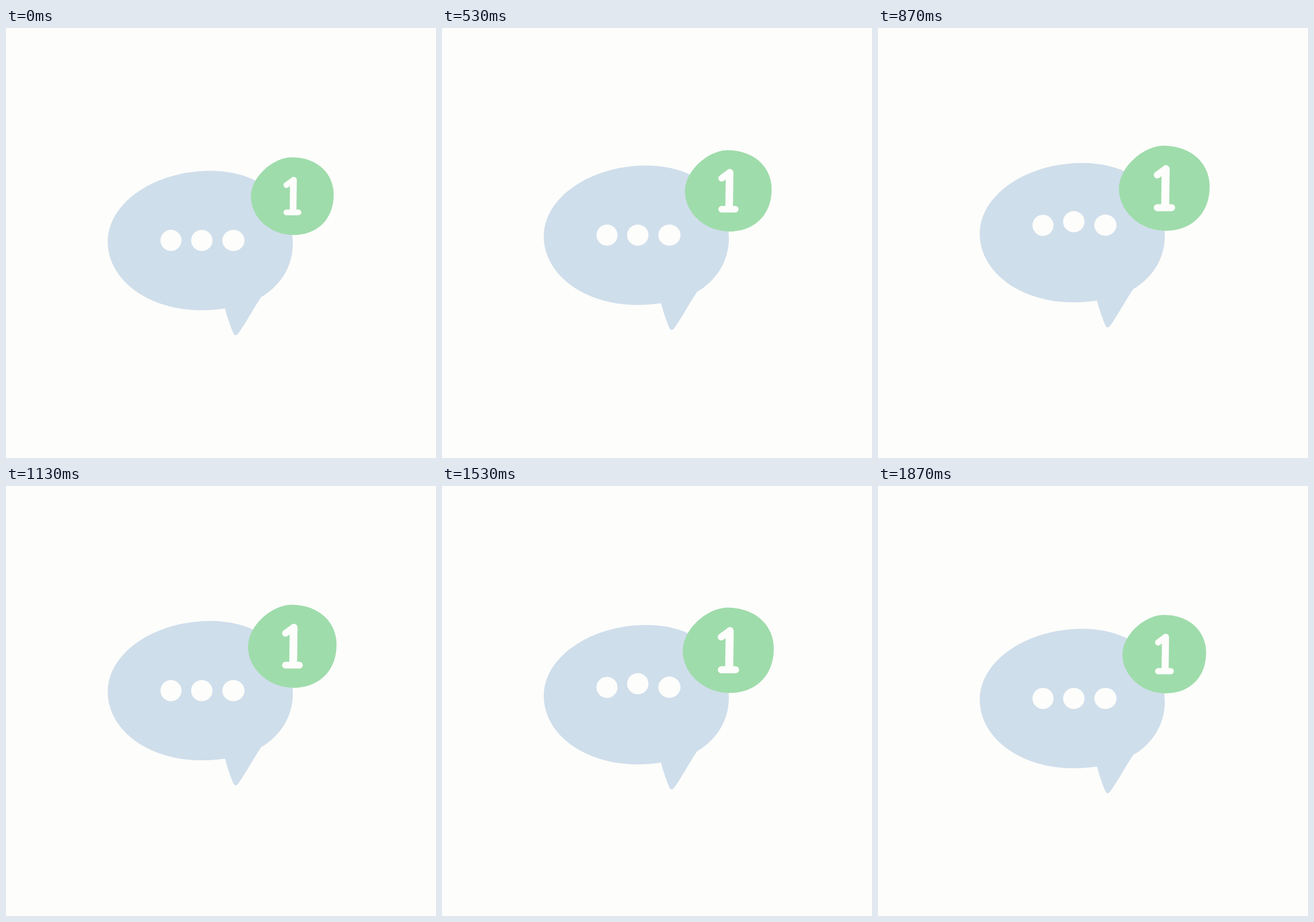
An HTML page that plays this animation: 748x748 px, repeating every 1910 ms.

```html
<!DOCTYPE html>
<html lang="en">
<head>
<meta charset="utf-8">
<title>New message</title>
<style>
html, body { margin: 0; width: 100%; height: 100%; overflow: hidden; background: #fdfdfb; }
svg { display: block; width: 100%; height: 100%; }
</style>
</head>
<body>
<svg viewBox="0 0 748 748">
  <g id="float">
    <path fill="#cfdeeb" d="M177 372C177 303 260 248.5 355 248.5C442 248.5 499 297 499 375
      C499 412 480 447 444 468C434 482 412 522 403 532.5Q399 537 396 532C391 521 385 504 381 488
      C367 490 354 491 340 491C246 491 177 437 177 372Z"/>
    <g fill="#fdfdfb">
      <ellipse class="dot" cx="287" cy="369.6" rx="18.3" ry="18.4"/>
      <ellipse class="dot" cx="340.6" cy="369.6" rx="18.6" ry="18.4"/>
      <ellipse class="dot" cx="395.6" cy="369.6" rx="19.3" ry="18.4"/>
    </g>
    <path id="badge" fill="#9fdcab" d="M426 293C426 259 465 225 497 225C540 225 570 252 570 290
      C570 333 541 360 500 360C460 360 426 330 426 293Z"/>
    <g id="one" fill="none" stroke="#fdfdfb" stroke-width="10" stroke-linecap="round" stroke-linejoin="round">
      <path d="M488 273.5L500.5 264.5M488 320.3H508.5"/>
      <path stroke-width="11.5" d="M500 265.5L499.3 319"/>
    </g>
  </g>
</svg>
<script>
const LOOP = 1910;
const beats = [0, 625, 1285, 1890];
const $ = id => document.getElementById(id);
const dots = document.querySelectorAll('.dot');
const ease = x => (1 - Math.cos(Math.PI * Math.min(1, Math.max(0, x)))) / 2;

// Half-sine hump centred on peak
const hump = (t, peak, half) =>
  Math.abs(t - peak) < half ? Math.cos((t - peak) / half * Math.PI / 2) : 0;

const scale = (el, s) =>
  el.setAttribute('transform', `translate(498 292.7) scale(${s}) translate(-498 -292.7)`);

function draw(now) {
  const t = now % LOOP;
  const lift = 13.7 * (ease(t / 865) - ease((t - 1150) / 750));
  $('float').setAttribute('transform', `translate(0 ${-lift})`);

  let pulse = 0;
  for (let i = 0; i < 3; i++) {
    const half = (beats[i + 1] - beats[i]) / 2;
    pulse += hump(t, beats[i] + half, half);
  }
  scale($('badge'), 1 + 0.104 * pulse);
  scale($('one'), 1 + 0.225 * Math.sqrt(pulse));

  dots.forEach((dot, i) => {
    let hop = 0;
    for (let b = 0; b < 3; b++) hop += hump(t, beats[b] + 160 + 85 * i, 160);
    dot.setAttribute('transform', `translate(0 ${-19 * hop})`);
  });
}

const start = performance.now();
function tick() {
  draw(performance.now() - start);
  requestAnimationFrame(tick);
}
tick();
</script>
</body>
</html>
```
